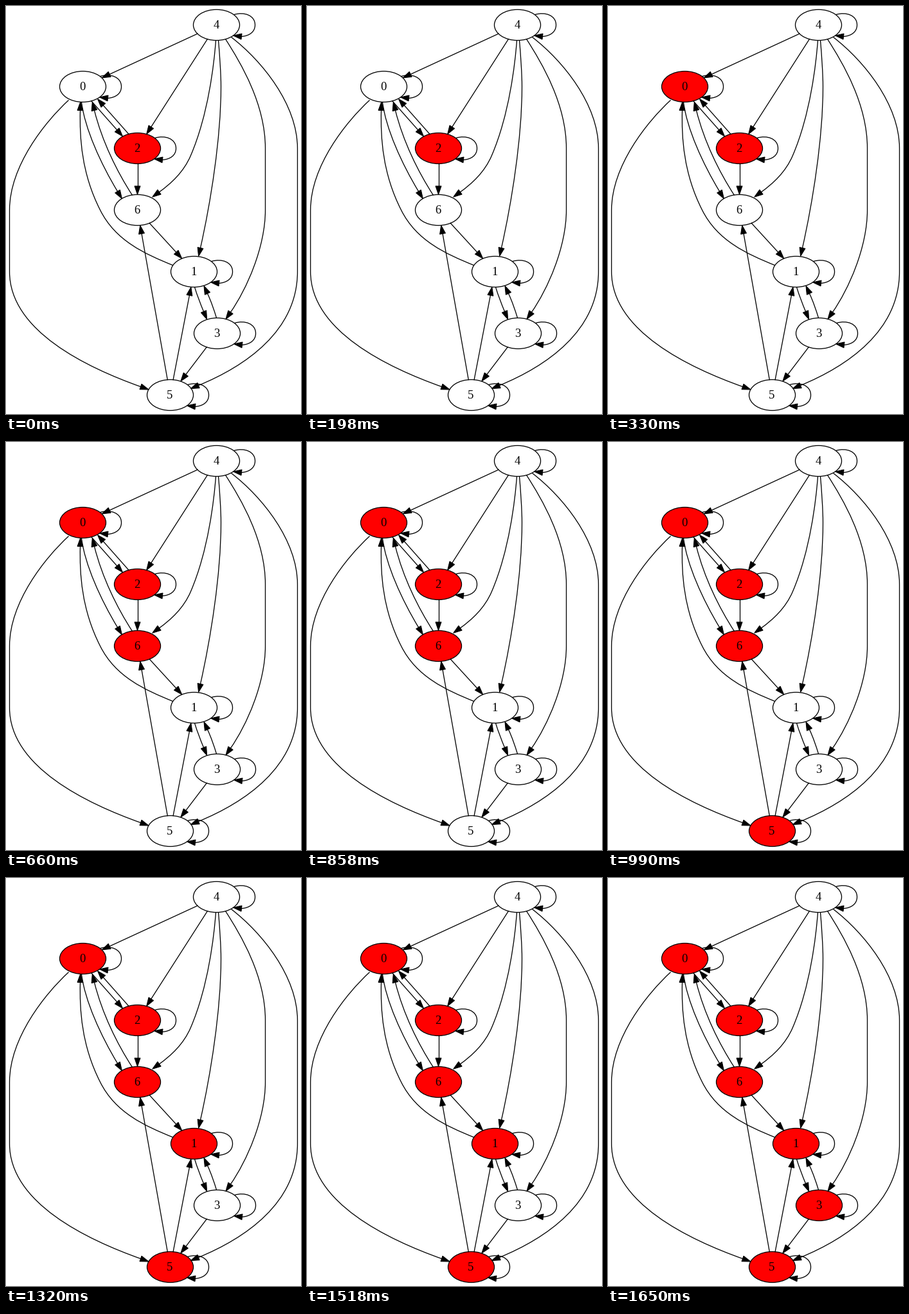
Animation, 459 px wide and 635 px high, one loop 1980 ms. Source, as a matplotlib script:

```python
import matplotlib.pyplot as plt
import numpy as np
from matplotlib.animation import FuncAnimation
from matplotlib.patches import Ellipse, PathPatch, Polygon
from matplotlib.path import Path

W, H, DPI = 459, 635, 64
PX = 72 / DPI  # one pixel in points
LINE = 1.3 * PX
RX, RY = 36, 24
HEAD = 13.3
TOP, GAP = 29, 96  # first rank and distance between ranks

RANKS = {4: 327, 0: 119, 2: 204, 6: 204, 1: 292, 3: 328, 5: 255}
NODES = {n: np.array([x, TOP + GAP * i], float)
         for i, (n, x) in enumerate(RANKS.items())}
VISITS = [2, 0, 6, 5, 1, 3]
LOOPS = [4, 0, 2, 1, 3, 5]
STRAIGHT = ["40", "42", "26", "61", "35", "56", "51"]

# Bezier points up to the arrow base
CURVES = [
    [(326, 53), (323, 92), (314, 169), (287, 232),
     (276, 258), (256, 276), (238, 289)],
    [(330, 53), (332, 77), (334, 105), (334, 125),
     (334, 205), (318, 305), (302, 376)],
    [(259, 403), (215, 385), (170, 365), (146, 317),
     (117, 260), (114, 205), (115, 162)],
    [(117, 149), (122, 190), (147, 245), (173, 288)],
    [(196, 294), (172, 257), (149, 210), (137, 162)],
    [(293, 437), (297, 450), (302, 463), (307, 475)],
    [(327, 485), (323, 472), (319, 460), (313, 447)],
]

fig = plt.figure(figsize=(W / DPI, H / DPI), dpi=DPI, facecolor="white")
ax = fig.add_axes([0, 0, 1, 1])
ax.set_xlim(-0.5, W - 0.5)
ax.set_ylim(H - 0.5, -0.5)
ax.axis("off")


def unit(v):
    return v / np.hypot(*v)


def arrow_head(base, tip, half=4.5):
    d = unit(tip - base)
    side = half * np.array([-d[1], d[0]])
    ax.add_patch(Polygon([tip, base + side, base - side], fc="black",
                         ec="black", lw=PX, joinstyle="miter", zorder=3))


def curve(points, tip=None):
    pts = np.array(points, float)
    codes = [Path.MOVETO] + [Path.CURVE4] * (len(pts) - 1)
    ax.add_patch(PathPatch(Path(pts, codes), fc="none", ec="black",
                           lw=LINE, capstyle="butt", zorder=2))
    if tip is None:
        tip = pts[-1] + HEAD * unit(pts[-1] - pts[-2])
    arrow_head(pts[-1], tip)


def straight(a, b, shift=(0, 0)):
    """Line between two nodes, clipped at their outlines."""
    d = NODES[b] - NODES[a]
    rim = d / np.hypot(d[0] / RX, d[1] / RY)
    start, tip = NODES[a] + rim + shift, NODES[b] - rim + shift
    base = tip - HEAD * unit(d)
    ax.plot(*zip(start, base), color="black", lw=LINE, zorder=2)
    arrow_head(base, tip)


def detour(start, lead, x, rank, drop, turn, base):
    """Curve with a vertical run in the middle."""
    y0 = TOP + GAP * rank
    y1 = y0 + GAP * (2 if x > W - GAP / 2 else 1)
    run = [(x, y) for y in (y0 - 68, *np.linspace(y0, y1, 4), y1 + drop)]
    curve([start, lead, *run, turn, base])


def self_loop(center):
    rel = [(27, -16), (43, -21), (60, -15), (60, 0),
           (60, 11), (51, 17), (39, 18)]
    curve(center + np.array(rel), center + np.array([26, 16.5]))


ovals = {}
for name, (x, y) in NODES.items():
    ovals[name] = ax.add_patch(Ellipse((x, y), 2 * RX, 2 * RY, fc="white",
                                       ec="black", lw=LINE, zorder=1))
    ax.text(x - 0.5, y + 5.5, str(name), family="Liberation Serif",
            size=18.67 * PX, ha="center", va="baseline", zorder=4)

for name in LOOPS:
    self_loop(NODES[name])
for a, b in STRAIGHT:
    straight(int(a), int(b))
straight(0, 2, (-4.7, 2))
straight(2, 0, (4.7, -1.5))
for points in CURVES:
    curve(points)
detour((341, 51), (366, 90), 403, 2, 58, (374, 440), (349, 476))
detour((350, 48), (398, 85), 453, 2, 92, (372, 560), (299, 590))
detour((97, 146), (60, 180), 5, 3, 92, (125, 562), (209, 592))


def update(step):
    seen = VISITS[:step + 1]
    for name, oval in ovals.items():
        oval.set_facecolor("red" if name in seen else "white")
    return list(ovals.values())


anim = FuncAnimation(fig, update, frames=len(VISITS), interval=330,
                     repeat=True, repeat_delay=0, blit=False)
plt.show()
```
